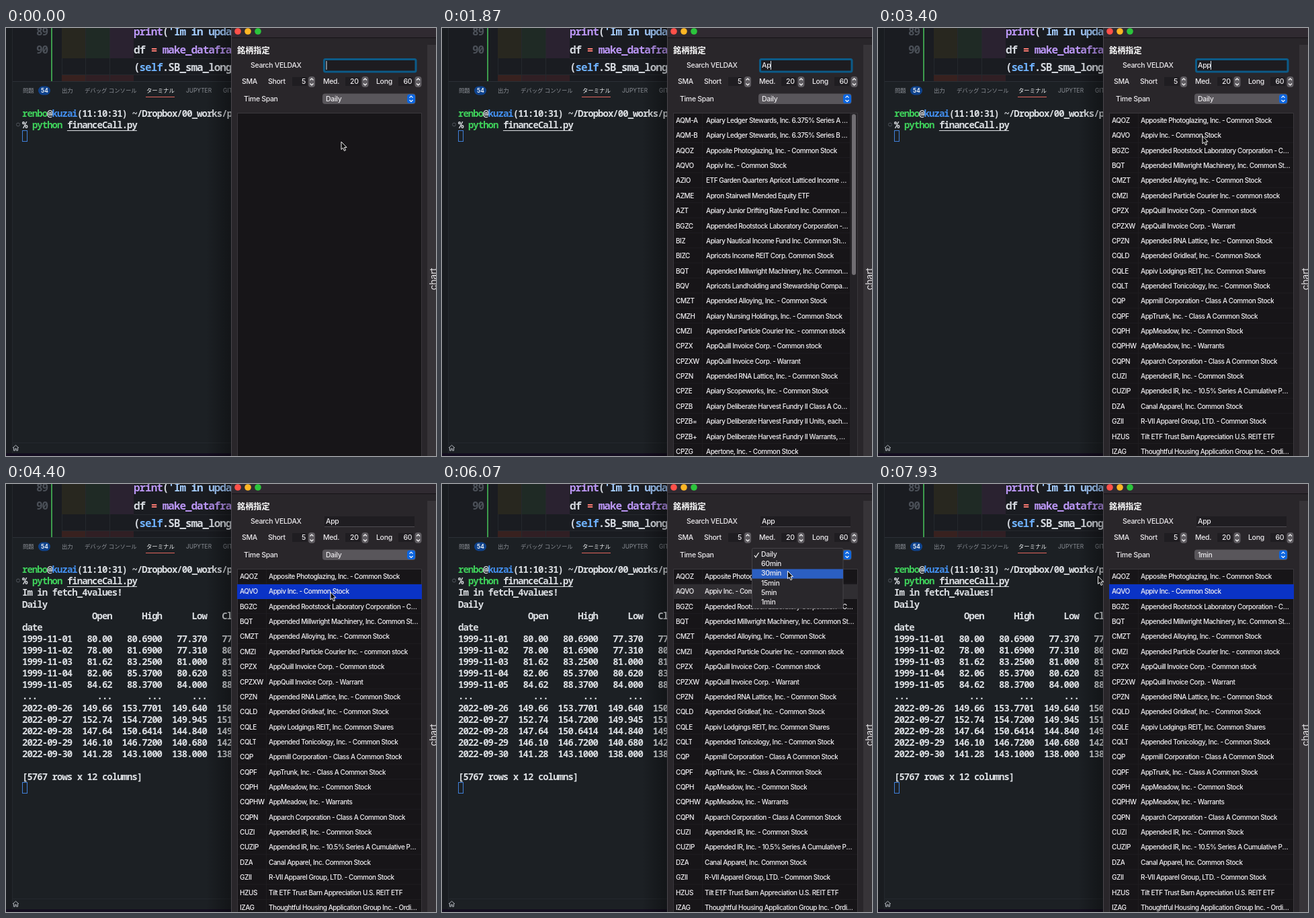
These frames come from a looping animation (640x636 px, 8 s). An HTML page:

```html
<!DOCTYPE html>
<html lang="ja">
<head>
<meta charset="utf-8">
<title>Stock search</title>
<style>
  html, body { margin: 0; width: 100%; height: 100%; overflow: hidden; background: #1c2024; }
  #stage { position: relative; width: 640px; height: 636px; overflow: hidden;
    font: 500 10.5px/1 Inter, sans-serif; letter-spacing: -.03em; color: #eceaed; }
  #stage svg, #stage div, #stage pre, #stage span[style] { position: absolute; }
  svg { left: 0; top: 0; overflow: visible; }
  span[style] { white-space: pre; transform: translateY(-50%); }
  .layer { inset: 0; }
  #editor { width: 335px; height: 636px; overflow: hidden; }
  #code { width: 335px; height: 78px; overflow: hidden; }
  pre { margin: 0; font-family: "Noto Sans Mono", monospace; font-weight: 600; font-stretch: 87.5%; }
  #code pre { font-size: 16px; line-height: 26.5px; letter-spacing: calc(8.55px - 1ch); top: -8px; color: #d5d9df; }
  #term pre { left: 24px; font-size: 14px; line-height: 17.11px; letter-spacing: calc(7.43px - 1ch); color: #dbdee2; }
  .tab { font: 400 8.4px/1 Inter, "Noto Sans CJK JP", "Noto Sans CJK", sans-serif; letter-spacing: 0; color: #8d9198; }
  .title { font: 700 12.2px/1 "Noto Sans CJK JP", "Noto Sans CJK", sans-serif; letter-spacing: 0; color: #fff; }
  .list { left: 0; top: 126px; width: 640px; height: 510px; overflow: hidden;
    font-size: 10px; letter-spacing: -.045em; color: #f3f1f4; }
  .list span { line-height: 14px; overflow: hidden; text-overflow: ellipsis; }
  #chart { font: 400 14px/1 Inter, sans-serif; color: #e4e2e5; letter-spacing: -.02em; left: 636px; top: 373px;
    transform: translate(-50%, -50%) rotate(-90deg); }
  .red { color: #ff7b72 } .violet { color: #bb96f5 } .sky { color: #a5cdff } .blue { color: #6fb2ff }
  .green { color: #3fd15b } .host { color: #4390f0 } u { text-underline-offset: 3px; text-decoration-thickness: 1px; }
</style>
</head>
<body>
<div id="stage">
  <div id="editor">
    <svg width="335" height="636">
      <rect width="335" height="79" fill="#1a1c21"/>
      <path fill="#28271f" d="M83 0h36v45H83z"/>
      <path fill="#1f2a25" d="M119 0h35v45h-35z"/>
      <path fill="#2a2230" d="M154 0h36v45h-36z"/>
      <path fill="#38211f" d="M83 70h36v9H83z"/>
      <path fill="#301f24" d="M119 70h71v9h-71z"/>
      <path stroke="#25282d" d="M83.500 45v25M118.500 0v79M154.500 0v79M190 45.500h145M83 69.500h252"/>
      <path stroke="#3d9b4c" stroke-width="2" d="M68 0v79"/>
      <path stroke="#2b3036" d="M10 79.500h325"/>
      <path stroke="#24282d" d="M10 616.500h325"/>
      <path fill="#191c20" d="M0 0h9v632H0z"/>
      <path stroke="#24282d" d="M9.500 0v632"/>
      <path fill="#140d20" d="M0 632h335v4H0z"/>
      <rect x="48" y="86.500" width="18" height="13" rx="6.500" fill="#0e428c"/>
      <path stroke="#e2655d" d="M208 102.500h43"/>
      <circle cx="18" cy="143.500" r="2.500" fill="none" stroke="#50555c"/>
      <path fill="none" stroke="#b3b7bd" d="M10 624l4.500-4 4.500 4M11.500 623.500v4.500h2v-3h2v3h2v-4.500"/>
    </svg>
    <div id="code">
      <pre style="left:45px;color:#4b5058">89
90</pre>
      <pre style="left:190px"><span class="violet">print</span>(<span class="sky">'Im in update</span>
df <span class="red">=</span> <span class="violet">make_dataframe</span>
(<span class="blue">self</span>.SB_sma_long.
b              [</pre>
    </div>
    <div id="tabs"></div>
    <div id="term">
      <pre style="top:118px"><span class="green">renbo</span>@<span class="host">kuzai</span>(11:10:31) ~/Dropbox/00_works/py
% <span class="green">python</span> <u>financeCall.py</u></pre>
      <pre style="top:152.400px" data-show="3600 8000">Im in fetch_4values!
Daily</pre>
      <pre id="frame" style="top:186.700px" data-show="4200 8000"></pre>
    </div>
    <svg width="335" height="636">
      <defs>
        <linearGradient id="shade"><stop stop-opacity="0"/><stop offset="1" stop-opacity=".35"/></linearGradient>
      </defs>
      <rect id="prompt" x="24.500" width="7" height="16" fill="none" stroke="#3f7fd8"/>
      <rect x="297" width="38" height="636" fill="url(#shade)"/>
    </svg>
  </div>

  <div id="window" class="layer">
    <svg width="640" height="636">
      <defs>
        <g id="stepper">
          <rect x="-5" y="-8" width="10" height="16" rx="4" fill="#605d62"/>
          <path d="M-2.500-2.500L0-5l2.500 2.500M-2.500 2.500L0 5l2.500-2.500" fill="none" stroke="#fff" stroke-width="1.200"/>
        </g>
        <pattern id="rows" y="126" width="275" height="22.360" patternUnits="userSpaceOnUse">
          <path stroke="#1e1c20" d="M0 22h275"/>
        </pattern>
      </defs>
      <path fill="#29262a" d="M335 0h305v636H335z"/>
      <path fill="#302a31" d="M335 0h305v14H335z"/>
      <path stroke="#151316" d="M335 14.500h305"/>
      <path stroke="#4a474c" d="M335.500 0v636"/>
      <circle cx="345" cy="5" r="4.800" fill="#ff5049"/>
      <circle cx="360" cy="5" r="4.800" fill="#fdb624"/>
      <circle cx="375" cy="5" r="4.800" fill="#2bc53c"/>
      <path fill="#373438" d="M627 25h13v611h-13z"/>
      <path fill="#1f1d21" d="M426 73h22v13h-22zM505 73h22v13h-22zM584 73h22v13h-22zM474 48h134v15H474z"/>
      <path stroke="#4f4c52" d="M474 63.500h134"/>
      <use href="#stepper" x="455" y="80"/>
      <use href="#stepper" x="534.500" y="80"/>
      <use href="#stepper" x="613.500" y="80"/>
      <rect x="473.500" y="46.500" width="136.500" height="18.500" rx="2" fill="#1d1c20" stroke="#0c5b88" stroke-width="3" data-show="0 3470"/>
      <path id="caret" stroke="#d8e6f2" d="M0 49v13"/>
      <rect x="471" y="97.500" width="138.500" height="15.500" rx="4" fill="#59565b"/>
      <rect x="597" y="98.500" width="12" height="13.500" rx="3.500" fill="#0d66e0"/>
      <path d="M600.500 103.700l2.500-2.500 2.500 2.500M600.500 107l2.500 2.500 2.500-2.500" fill="none" stroke="#fff" stroke-width="1.200"/>
      <path fill="#171518" stroke="#3a373c" d="M344.500 126.500h274v520h-274z"/>
      <g data-show="1600 8000">
        <path fill="url(#rows)" d="M345 127h273v509H345z"/>
        <path stroke="#1e1c20" d="M387.500 127v509"/>
      </g>
      <rect id="selection" x="344" y="149" width="275" height="22" data-show="3470 8000"/>
      <g data-show="1600 2130">
        <path fill="#242226" d="M607 127h11v509h-11z"/>
        <rect x="610" y="128" width="6" height="239" rx="3" fill="#706d72"/>
      </g>
    </svg>
    <div id="labels"></div>
    <span id="chart" style="">chart</span>
  </div>

  <div id="popup" class="layer" data-show="5530 7130">
    <svg width="640" height="636">
      <rect x="461.500" y="95.500" width="135.500" height="89.500" rx="2" fill="#29272b" stroke="#454247"/>
      <rect id="hover" x="461.500" width="135.500" height="14.200" fill="#2b5fc2"/>
      <path fill="none" stroke="#fff" stroke-width="1.200" d="M465 106l2 3 4.500-7"/>
    </svg>
  </div>

  <svg width="640" height="636">
    <path id="mouse" fill="#0a0a0a" stroke="#f5f5f5" stroke-width="1" d="M0 0v11.500l2.600-2.300 1.900 4.300 2-.9-1.900-4.200h3.500z"/>
  </svg>
</div>

<script>
const LOOP = 8000;
const $ = id => document.getElementById(id);

function text(parent, x, y, string, className = '', show = '') {
  const span = document.createElement('span');
  span.textContent = string;
  span.className = className;
  span.style.cssText = `left:${x}px;top:${y}px`;
  if (show) span.dataset.show = show;
  parent.append(span);
  return span;
}

// Terminal table
const tableRow = ([date, open, high, low, close]) =>
  date.padEnd(10) + open.padStart(8) + high.padStart(10) + low.padStart(9) + '  ' + close.padStart(3);
$('frame').textContent = `|Open|High|Low| Cl
date||||
1999-11-01|80.00|80.6900|77.370|77
1999-11-02|78.00|81.6900|77.310|80
1999-11-03|81.62|83.2500|81.000|81
1999-11-04|82.06|85.3700|80.620|83
1999-11-05|84.62|88.3700|84.000|88
...|...|...|...|
2022-09-26|149.66|153.7701|149.640|150
2022-09-27|152.74|154.7200|149.945|151
2022-09-28|147.64|150.6414|144.840|149
2022-09-29|146.10|146.7200|140.680|142
2022-09-30|141.28|143.1000|138.000|138`
  .split('\n').map(line => tableRow(line.split('|'))).join('\n') + '\n\n[5767 rows x 12 columns]';

// Panel tabs and form labels
[[25, '問題'], [83, '出力'], [117, 'デバッグ コンソール'], [209, 'ターミナル'], [268, 'JUPYTER'], [323, 'GIT']]
  .forEach(([x, name]) => text($('tabs'), x, 93, name, 'tab').style.color = x === 209 ? '#f0f2f4' : '');
Object.assign(text($('tabs'), 52, 93, '54', 'tab').style, { color: '#fff', fontWeight: 600 });

const labels = $('labels');
text(labels, 344, 33, '銘柄指定', 'title');
text(labels, 364, 56, 'Search VELDAX');
[[351, 'SMA'], [390, 'Short'], [440, '5'], [472, 'Med.'], [512, '20'], [551, 'Long'], [591.5, '60']]
  .forEach(([x, label]) => text(labels, x, 79.5, label));
text(labels, 354, 105.5, 'Time Span');
text(labels, 476, 105.5, 'Daily', '', '0 7130');
text(labels, 476, 105.5, '1min', '', '7130 8000');
['Daily', '60min', '30min', '15min', '5min', '1min']
  .forEach((item, i) => text($('popup'), 475, 105 + 14.2 * i, item));

// Typed query: time, value, caret position
const keys = [[0, '', 477], [1450, 'A', 484], [1600, 'Ap', 489.5], [2130, 'App', 495.5]];
keys.forEach(([from, value], i) =>
  text(labels, 476, 56, value, '', `${from} ${keys[i + 1]?.[0] ?? LOOP}`));

const stocks = `AQM-A|Apiary Ledger Stewards, Inc. 6.375% Series A Preferred
AQM-B|Apiary Ledger Stewards, Inc. 6.375% Series B Preferred
AQOZ|Apposite Photoglazing, Inc. - Common Stock
AQVO|Appiv Inc. - Common Stock
AZIO|ETF Garden Quarters Apricot Latticed Income ETF Shares
AZME|Apron Stairwell Mended Equity ETF
AZT|Apiary Junior Drifting Rate Fund Inc. Common Stock
BGZC|Appended Rootstock Laboratory Corporation - Common Stock
BIZ|Apiary Nautical Income Fund Inc. Common Shares Held
BIZC|Apricots Income REIT Corp. Common Stock
BQT|Appended Millwright Machinery, Inc. Common Stock Units
BQV|Apricots Landholding and Stewardship Company Common
CMZT|Appended Alloying, Inc. - Common Stock
CMZH|Apiary Nursing Holdings, Inc. - Common Stock
CMZI|Appended Particle Courier Inc. - common stock
CPZX|AppQuill Invoice Corp. - Common stock
CPZXW|AppQuill Invoice Corp. - Warrant
CPZN|Appended RNA Lattice, Inc. - Common Stock
CPZE|Apiary Scopeworks, Inc. - Common Stock
CPZB|Apiary Deliberate Harvest Fundry II Class A Common
CPZB=|Apiary Deliberate Harvest Fundry II Units, each of one
CPZB+|Apiary Deliberate Harvest Fundry II Warrants, each
CPZG|Apertone, Inc. - Common Stock
CQLD|Appended Gridleaf, Inc. - Common Stock
CQLE|Appiv Lodgings REIT, Inc. Common Shares
CQLT|Appended Tonicology, Inc. - Common Stock
CQP|Appmill Corporation - Class A Common Stock
CQPF|AppTrunk, Inc. - Class A Common Stock
CQPH|AppMeadow, Inc. - Common Stock
CQPHW|AppMeadow, Inc. - Warrants
CQPN|Apparch Corporation - Class A Common Stock
CUZI|Appended IR, Inc. - Common Stock
CUZIP|Appended IR, Inc. - 10.5% Series A Cumulative Perpetual
DZA|Canal Apparel, Inc. Common Stock
GZII|R-VII Apparel Group, LTD. - Common Stock
HZUS|Tilt ETF Trust Barn Appreciation U.S. REIT ETF
IZAG|Thoughtful Housing Application Group Inc. - Ordinary Shares`.split('\n').map(row => row.split('|'));

function addList(query, nameX, width, show) {
  const list = document.createElement('div');
  list.className = 'list';
  list.dataset.show = show;
  const match = new RegExp('\\b' + query, 'i');
  stocks.filter(([, name]) => match.test(name)).slice(0, 23).forEach(([ticker, name], i) => {
    const y = 11 + 22.36 * i;
    text(list, 348, y, ticker);
    text(list, nameX, y, name).style.maxWidth = width + 'px';
  });
  labels.append(list);
}
addList('ap', 393, 212, '1600 2130');
addList('app', 391, 224, '2130 8000');

// Pointer: time, x, y
const path = [[0, 499, 169], [2740, 499, 169], [3250, 483, 160.5], [4500, 483, 160.5], [5150, 521, 104],
  [5800, 521, 104], [6450, 503.5, 171], [7400, 503.5, 171], [7930, 327.5, 137], [LOOP, 327.5, 137]];
const smooth = k => k * k * (3 - 2 * k);

function pointer(t) {
  const i = path.findIndex(([time]) => time > t);
  const [t0, x0, y0] = path[i - 1], [t1, x1, y1] = path[i];
  const k = smooth((t - t0) / (t1 - t0));
  return [x0 + (x1 - x0) * k, y0 + (y1 - y0) * k];
}

const timed = [...document.querySelectorAll('[data-show]')].map(el => [el, ...el.dataset.show.split(' ').map(Number)]);
const visible = (el, on) => el.style.visibility = on ? 'visible' : 'hidden';

function render(t) {
  for (const [el, from, to] of timed) visible(el, t >= from && t < to);

  const [x, y] = pointer(t);
  $('mouse').setAttribute('transform', `translate(${x} ${y})`);
  visible($('mouse'), t < 1000 || t >= 2740);

  const [typedAt, , caretX] = keys.filter(([from]) => from <= t).pop();
  $('caret').setAttribute('transform', `translate(${caretX})`);
  visible($('caret'), t < 3470 && (t - typedAt) % 1000 < 500);

  const promptRow = t < 3600 ? 2 : t < 4200 ? 4 : 19;
  $('prompt').setAttribute('y', Math.round(118 + 17.11 * promptRow) + .5);

  const popupOpen = t >= 5530 && t < 7130;
  $('selection').setAttribute('fill', popupOpen ? '#302e32' : '#0a33c6');
  const item = Math.min(5, Math.max(0, Math.floor((y - 97.5) / 14.2)));
  $('hover').setAttribute('y', 98 + 14.2 * item);
}

const start = performance.now();
(function tick() {
  render((performance.now() - start) % LOOP);
  requestAnimationFrame(tick);
})();
</script>
</body>
</html>
```
